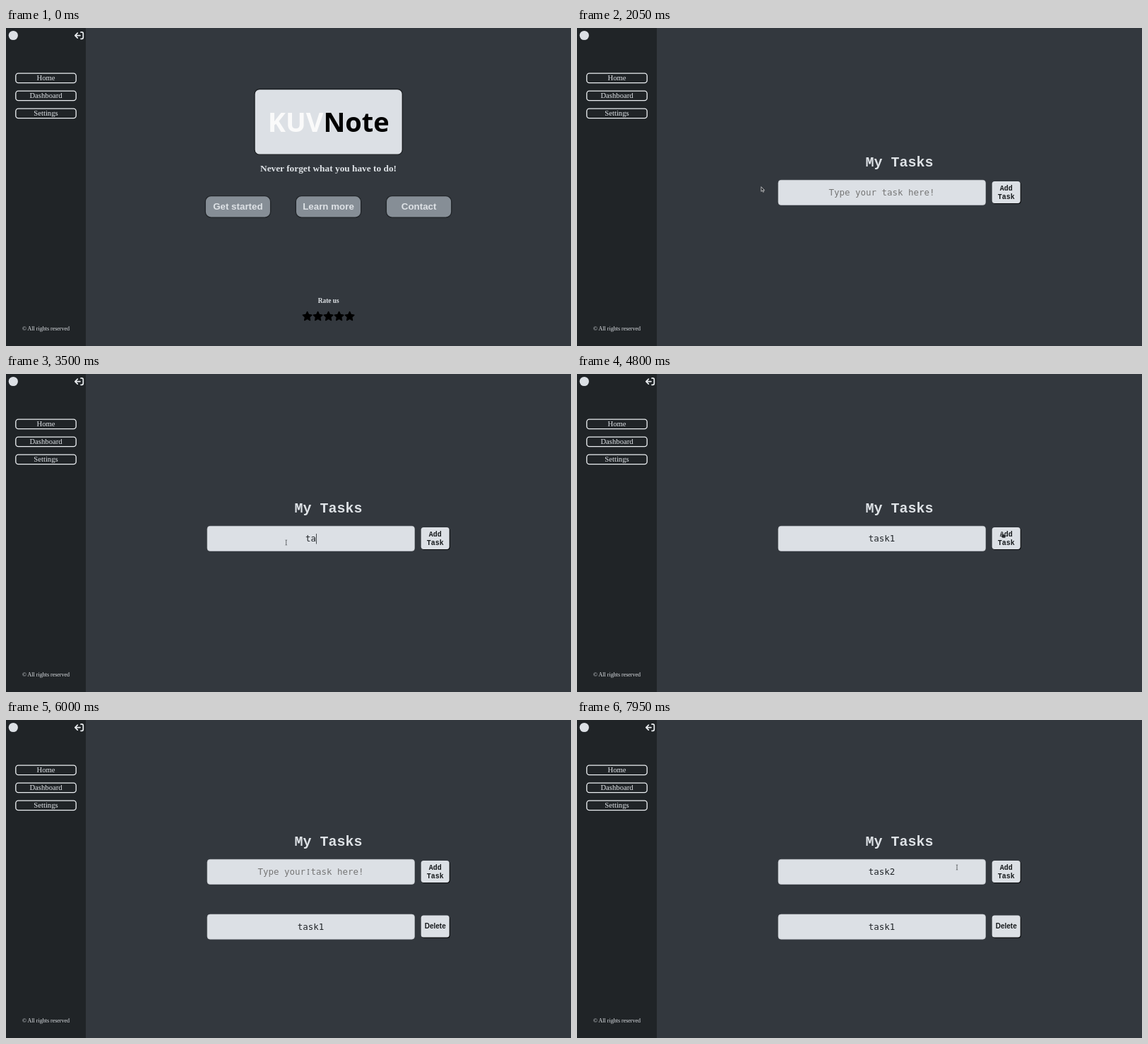
Recreate the animation shown at these times as an HTML page. Size 800 by 450 pixels, loop 8 s.

```html
<!DOCTYPE html>
<html lang="en">
<head>
<meta charset="utf-8">
<title>Task list</title>
<style>
  html, body { margin: 0; height: 100%; overflow: hidden; background: #33383e; }
  svg { display: block; width: 100vw; height: 100vh; }
  text { text-anchor: middle; fill: #dee2e6; white-space: pre; }
  .serif { font-family: "Liberation Serif", serif; }
  .sans { font: bold 13.33px "Liberation Sans", sans-serif; }
  .mono { font: bold 10px "Liberation Mono", monospace; }
  .field { font: 12.44px "DejaVu Sans Mono", monospace; fill: #212529; }
  .bold { font-weight: bold; }
  .dark { fill: #16191c; }
  .light { fill: #dce0e5; }
  .line { fill: none; stroke: #eceff2; stroke-width: 1.33; }
</style>
</head>
<body>
<svg viewBox="0 0 800 450">
  <rect width="800" height="450" fill="#33383e"/>
  <rect width="113" height="450" fill="#202427"/>
  <circle cx="10.3" cy="10.5" r="6.6" class="light"/>
  <g id="logout" class="line" style="stroke-width:1.7" stroke-linecap="round" stroke-linejoin="round">
    <path d="M106 5.9h1.3a2 2 0 0 1 2 2v5.4a2 2 0 0 1-2 2H106M98 10.6h7M101.3 7.1L97.8 10.6l3.5 3.5"/>
  </g>
  <g id="menu" class="serif" font-size="10.67"></g>
  <text class="serif" x="56.5" y="428" font-size="8">© All rights reserved</text>

  <g id="home">
    <rect x="352" y="86.5" width="209.3" height="92.7" rx="7" class="light" stroke="#1b1e21" stroke-width="1.33"/>
    <text x="456.8" y="147" font-family="Noto Sans, sans-serif" font-weight="600" font-size="38"><tspan fill="#fafafa">KUV</tspan><tspan fill="#000">Note</tspan></text>
    <text class="serif bold" x="456.5" y="203" font-size="13.33">Never forget what you have to do!</text>
    <g id="actions"></g>
    <text class="serif bold" x="456.7" y="389" font-size="9.33">Rate us</text>
    <g id="stars" stroke-width="1.5" stroke-linejoin="round"></g>
  </g>

  <g id="dashboard">
    <g id="form">
      <text class="mono" x="456.5" y="195.8" style="font-size:20px">My Tasks</text>
      <g class="row" transform="translate(0 215.3)"></g>
      <text id="entry" class="field" x="431.5" y="237.3"></text>
      <rect id="caret" y="226" width=".8" height="14.5" fill="#212529"/>
      <text class="mono dark" x="607.7" y="230.2">Add</text>
      <text class="mono dark" x="607.7" y="241.5">Task</text>
    </g>
    <g id="saved">
      <g class="row" transform="translate(0 275)"></g>
      <text class="field" x="431.5" y="297">task1</text>
      <text class="sans dark" x="607.7" y="294.8" style="font-size:10px">Delete</text>
    </g>
  </g>

  <g id="cursor" stroke-linejoin="round">
    <path id="arrow" d="M0 0V6.6L1.6 5.2L2.7 7.6L3.9 7L2.8 4.8H4.7Z" fill="#25282c" stroke="#e8e8e8" stroke-width=".7"/>
    <path id="beam" d="M-1.2 -3.6Q0 -3.6 0 -2.8Q0 -3.6 1.2 -3.6M0 -2.8V2.8M-1.2 3.6Q0 3.6 0 2.8Q0 3.6 1.2 3.6" fill="none" stroke="#4a4d50" stroke-width=".8"/>
    <path id="hand" d="M-1 0Q0 -1 .8 0V2.6L4.2 3.4Q5 3.7 4.8 4.7L4 8H-.2L-2.8 4.9Q-2.6 3.8 -1 4.7Z" fill="#25282c" stroke="#d5d8db" stroke-width=".6"/>
  </g>
</svg>
<script>
const LOOP = 8000, HOME_END = 1800, ICON_BACK = 2650, SAVED = 4900;
const $ = id => document.getElementById(id);
const show = (id, on) => $(id).style.display = on ? "" : "none";

["Home", "Dashboard", "Settings"].forEach((label, i) => {
  const y = 25 * i;
  $("menu").innerHTML += `<rect class="line" x="13.8" y="${64.1 + y}" width="85.4" height="13.6" rx="3.6"/>
    <text x="56.5" y="${74.3 + y}">${label}</text>`;
});

["Get started", "Learn more", "Contact"].forEach((label, i) => {
  const x = 328.4 + 128.1 * i;
  $("actions").innerHTML += `<rect x="${x - 46.2}" y="237.7" width="92.4" height="30.4" rx="8" fill="#868e96" stroke="#212529" stroke-width="1.33"/>
    <text class="sans" x="${x}" y="257.3">${label}</text>`;
});

document.querySelectorAll(".row").forEach(row => row.innerHTML =
  `<rect x="285" width="293.5" height="35.2" rx="4" class="light" stroke="#c6cacf" stroke-width=".6"/>
   <rect x="588.5" y="2.3" width="40.3" height="31.4" rx="4" fill="#0c0e10"/>
   <rect x="587.7" y="1.6" width="40" height="31" rx="3.6" class="light"/>`);

// Five-pointed star; with count 6 only its left half is traced.
const starPath = (cx, count) => "M" + Array.from({ length: count }, (_, i) => {
  const angle = -Math.PI / 2 - i * Math.PI / 5, r = i % 2 ? 3.2 : 6.6;
  return `${cx + r * Math.cos(angle)} ${408.2 + r * Math.sin(angle)}`;
}).join("L") + "Z";

function drawStars(rating) {
  const color = rating ? "#dbe2e8" : "#000";
  let out = "";
  for (let i = 0; i < 5; i++) {
    const cx = 426.6 + 15 * i, half = rating && rating - i < 1;
    out += `<path d="${starPath(cx, 10)}" fill="${half ? "none" : color}" stroke="${color}"/>`;
    if (half) out += `<path d="${starPath(cx, 6)}" fill="${color}"/>`;
  }
  $("stars").innerHTML = out;
}

// Time, x and y of the pointer.
const PATH = [
  [50, 803, 452], [900, 530, 416], [1200, 488, 407], [1300, 488, 407],
  [1650, 42, 96], [1800, 42, 96], [2150, 313.7, 255.8], [2450, 396.7, 238.5],
  [3980, 396.7, 238.5], [4250, 602.5, 224], [4900, 602.5, 224], [5100, 478, 232],
  [5900, 428, 215], [7680, 428, 215], [7950, 538, 208.5], [8000, 538, 208.5]
];

function pointerAt(t) {
  const i = PATH.findIndex(p => p[0] > t);
  if (i < 1) return null;
  const [t0, x0, y0] = PATH[i - 1], [t1, x1, y1] = PATH[i];
  const k = (t - t0) / (t1 - t0), e = k * k * (3 - 2 * k);
  return [x0 + (x1 - x0) * e, y0 + (y1 - y0) * e];
}

function pointerKind(x, y, home, shift) {
  const inside = (l, t, r, b) => x > l && x < r && y > t && y < b;
  if (inside(13, 63, 100, 128)) return "hand";
  if (home) return inside(419, 400, 494, 415) ? "hand" : "arrow";
  if (inside(285, 215 + shift, 579, 251 + shift)) return "beam";
  return inside(587, 217 + shift, 628, 249 + shift) ? "hand" : "arrow";
}

const TYPING = [
  { word: "task1", focus: 2700, keys: [3250, 3450, 3600, 3750, 3950], end: 4700 },
  { word: "task2", focus: 6300, keys: [6650, 6850, 7000, 7150, 7350], end: LOOP }
];

function drawEntry(t) {
  const { word, focus, keys, end } = TYPING[t < SAVED ? 0 : 1];
  const typed = keys.filter(k => k <= t).length;
  const entry = $("entry");
  entry.textContent = typed ? word.slice(0, typed) : "Type your task here!";
  entry.style.fill = typed ? "" : "#757575";
  const since = t - (typed ? keys[typed - 1] : focus);
  show("caret", t >= focus && t < end && since % 1000 < 500);
  $("caret").setAttribute("x", 431.5 + typed * 3.75);
}

let shownRating = -1;
function render(t) {
  const home = t < HOME_END, saved = t >= SAVED, shift = saved ? -18 : 0;
  show("home", home);
  show("dashboard", !home);
  show("saved", saved);
  show("logout", home || t >= ICON_BACK);
  $("form").setAttribute("transform", `translate(0 ${shift})`);
  drawEntry(t);

  const rating = t < 1100 ? 0 : 4.5;
  if (rating !== shownRating) drawStars(shownRating = rating);

  const pos = pointerAt(t);
  show("cursor", pos);
  if (pos) {
    const kind = pointerKind(...pos, home, shift);
    ["arrow", "beam", "hand"].forEach(id => show(id, id === kind));
    $("cursor").setAttribute("transform", `translate(${pos})`);
  }
}

const start = performance.now();
function tick() {
  render((performance.now() - start) % LOOP);
  requestAnimationFrame(tick);
}
tick();
</script>
</body>
</html>
```
